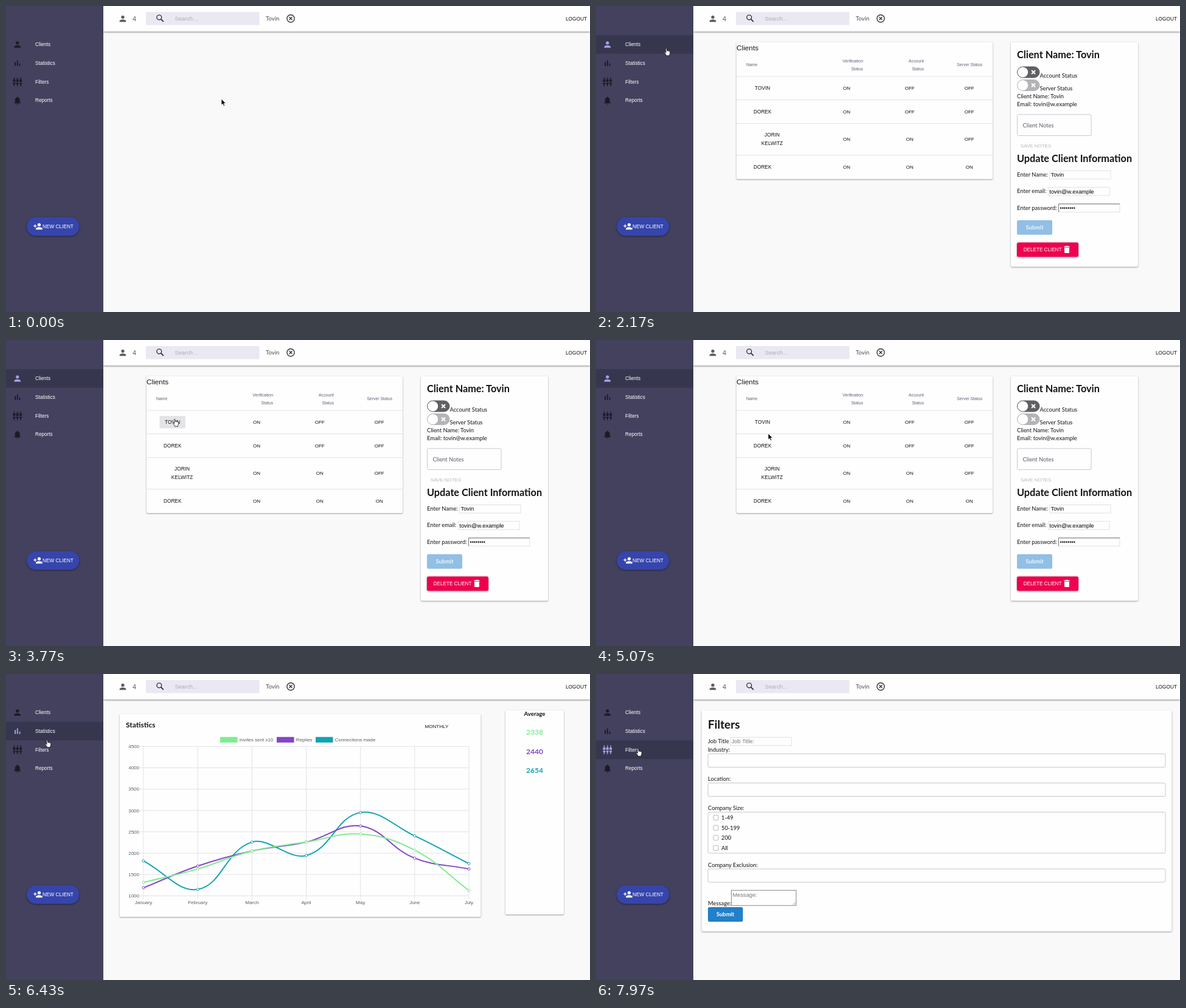
An HTML page that plays this animation: 960x504 px, repeating every 8 s.

```html
<!DOCTYPE html>
<html lang="en">
<head>
<meta charset="utf-8">
<title>Client dashboard</title>
<style>
  html, body { margin: 0; width: 100%; height: 100%; overflow: hidden; background: #f9f9fa; }
  svg { display: block; width: 960px; height: 504px; }
  text { font-family: "Liberation Sans", Arial, sans-serif; fill: #141418; white-space: pre; }
  .lato { font-family: Lato, sans-serif; }
  .bold { font-family: Lato, sans-serif; font-weight: 700; }
  .mid { text-anchor: middle; }
  .end { text-anchor: end; }
  .card { fill: #fefefe; filter: drop-shadow(0 1px 1px #3c3c5080); }
  .raised { filter: drop-shadow(0 1.5px 1.5px #0007); }
  .field { fill: #fefefe; stroke: #c8c8d0; }
  .input { fill: #fefefe; stroke: #e2e2e8; }
  .grid { stroke: #e2e2ea; fill: none; }
</style>
</head>
<body>
<svg id="stage" viewBox="0 0 960 504"></svg>
<script>
const LOOP = 8000;
const CLIENTS_AT = 1900, STATS_AT = 6200, FILTERS_AT = 7600;
const CLIENT = 'Tovin', EMAIL = 'tovin@w.example';

// ---- Markup helpers ----
const text = (x, y, label, size = 8.2, cls = '', fill = '') =>
  `<text x="${x}" y="${y}" font-size="${size}" class="${cls}"${fill && ` style="fill:${fill}"`}>${label}</text>`;
const lato = (x, y, label, fill) => text(x, y, label, 9.33, 'lato', fill);
const rect = (x, y, w, h, attrs = '') => `<rect x="${x}" y="${y}" width="${w}" height="${h}" ${attrs}/>`;
const card = (x, y, w, h) => rect(x, y, w, h, 'rx="2" class="card"');
const field = (x, y, w, h) => rect(x, y, w, h, 'rx="2" class="field"');
const input = (x, y) => rect(x, y, 100.5, 13.5, 'class="input"');
const path = (d, attrs = '') => `<path d="${d}" ${attrs}/>`;
const icon = (x, y, d, size, attrs) =>
  `<g transform="translate(${x} ${y}) scale(${size / 24})">${path(d, attrs)}</g>`;

const slider = x =>
  `M${x + 2} 1h2v5h2v6h-6V6h2zM${x} 14h6v2a3 3 0 0 1-2 2.8V23h-2v-4.2a3 3 0 0 1-2-2.8z`;
const ICONS = {
  person: 'M12 12a4 4 0 1 0 0-8 4 4 0 0 0 0 8zm0 2c-2.7 0-8 1.3-8 4v2h16v-2c0-2.7-5.3-4-8-4z',
  bars: 'M5 9.2h3V19H5zM10.6 5h2.8v14h-2.8zM16.2 13H19v6h-2.8z',
  sliders: [1, 9, 17].map(slider).join(''),
  bell: 'M12 22a2 2 0 0 0 2-2h-4a2 2 0 0 0 2 2zm6-6v-5c0-3-1.6-5.6-4.5-6.3V4a1.5 1.5 0 0 0-3 0v.7C7.6 5.4 6 8 6 11v5l-2 2v1h16v-1z',
  bin: 'M6 19a2 2 0 0 0 2 2h8a2 2 0 0 0 2-2V7H6zM19 4h-3.5l-1-1h-5l-1 1H5v2h14z',
  personAdd: 'M15 12a4 4 0 1 0 0-8 4 4 0 0 0 0 8zM6 10V7H4v3H1v2h3v3h2v-3h3v-2zm9 4c-2.7 0-8 1.3-8 4v2h16v-2c0-2.7-5.3-4-8-4z',
};

// ---- Frame around the pages ----
const MENU = [['Clients', 'person'], ['Statistics', 'bars'], ['Filters', 'sliders'], ['Reports', 'bell']];
const ICON_IDLE = '#1b1b26', ICON_ACTIVE = '#a3a0e6';
const rowY = i => 63.5 + i * 30.7;

const menuItem = ([label, name], i) =>
  `<g id="item${i}">${rect(0, rowY(i) - 15.5, 160, 30.7, 'fill="none"')}` +
  icon(10.8, rowY(i) - 8, ICONS[name], 16, `fill="${ICON_IDLE}"`) +
  text(48, rowY(i) + 2.8, label, 8.2, '', '#fff') + '</g>';

const sidebar = () =>
  rect(0, 0, 160, 504, 'fill="#43415e"') + MENU.map(menuItem).join('') +
  rect(34, 348, 86.5, 30.5, 'rx="15.2" fill="#3645ab" class="raised"') +
  icon(44.5, 355, ICONS.personAdd, 16, 'fill="#fff"') +
  text(60, 366.2, 'NEW CLIENT', 8.25, '', '#fff');

const topBar = () =>
  rect(160, 0, 800, 42, 'fill="#fefefe" style="filter:drop-shadow(0 1px 1.5px #3339)"') +
  icon(184, 13, ICONS.person, 16, 'fill="#5c5c62"') +
  text(208, 24.6, '4', 10.5, 'lato', '#55555c') +
  rect(230, 10, 186.5, 21.5, 'fill="#eae8f3"') +
  '<g fill="none" stroke="#33333a" stroke-width="1.4"><circle cx="251.8" cy="18.8" r="3.9"/>' +
  path('M254.7 21.7l4.2 4.2', 'stroke-width="1.9"') +
  '<circle cx="468" cy="20.6" r="6.1"/>' + path('M465.5 18.1l5 5m0-5l-5 5') + '</g>' +
  text(277.5, 24.2, 'Search…', 9.3, '', '#adacb6') +
  text(427, 23.8, CLIENT, 9.6, 'lato', '#4c4c54') +
  text(920, 23.6, 'LOGOUT', 8.3);

// ---- Clients ----
const TABLE = [
  [137.5, 273.7, [CLIENT.toUpperCase()], 'ON', 'OFF', 'OFF'],
  [176.5, 273.7, ['DOREK'], 'ON', 'OFF', 'OFF'],
  [222, 289.5, ['JORIN', 'KELWITZ'], 'ON', 'ON', 'OFF'],
  [268, 273.7, ['DOREK'], 'ON', 'ON', 'ON'],
];

const tableRow = ([y, nameX, names, ...states]) =>
  names.map((n, i) => text(nameX, y + (i - (names.length - 1) / 2) * 14, n, 8.3, 'mid')).join('') +
  states.map((s, i) => text([412, 515.7, 613.7][i], y, s, 8, 'mid')).join('');

const toggle = (y, track) =>
  rect(692.5, y, 36.5, 18, `rx="9" fill="${track}" stroke="${track}"`) +
  `<circle cx="701.6" cy="${y + 9}" r="8.6" fill="#fefefe"/>` +
  path(`M716 ${y + 6}l6 6m0-6l-6 6`, 'stroke="#fefefe" stroke-width="2"');

const clientsPage = () => {
  const small = (x, y, s, cls) => text(x, y, s, 6.9, cls, '#5f5f7a');
  return card(231, 59.5, 421, 225.5) + text(231, 73, 'Clients', 11.8) +
    small(247, 99, 'Name') + small(439, 93, 'Verification', 'end') + small(439, 105.7, 'Status', 'end') +
    small(539, 93, 'Account', 'end') + small(539, 105.7, 'Status', 'end') +
    small(635, 99, 'Server Status', 'end') +
    path('M231 116h421M231 154.5h421M231 193.5h421M231 245.7h421', 'class="grid"') +
    rect(252.5, 125, 42.5, 20.5, 'id="hover" rx="2" fill="#e4e4e7"') +
    TABLE.map(tableRow).join('') +

    card(682, 59.5, 209, 370) +
    text(692, 86, 'Client Name: ' + CLIENT, 16.25, 'bold') +
    toggle(100, '#606064') + lato(729.5, 118, 'Account Status') +
    toggle(121.5, '#b4b4b8') + lato(729.5, 139.3, 'Server Status') +
    lato(692, 152.3, 'Client Name: ' + CLIENT) + lato(692, 165, 'Email: ' + EMAIL) +
    field(692.5, 178.8, 121.5, 34.7) + lato(701.5, 199.8, 'Client Notes', '#5c5c62') +
    text(697.7, 232.7, 'SAVE NOTES', 8, '', '#b8b8be') +
    text(692, 257, 'Update Client Information', 16.25, 'bold') +
    lato(692, 281, 'Enter Name:') + input(745.5, 271.5) + text(747.5, 281.4, CLIENT, 9.33, '', '#000') +
    lato(692, 308.2, 'Enter email:') + input(743.5, 298.7) + text(745.3, 308.6, EMAIL, 9.33, '', '#000') +
    lato(692, 335.5, 'Enter password:') + input(760.5, 326) +
    path('M760.5 339.5v-13.5h100.5', 'fill="none" stroke="#77777c"') +
    text(762.5, 335.7, '••••••••', 9.1) +
    rect(692, 352.8, 58, 24, 'rx="2.5" fill="#91bfe5"') + text(721, 368, 'Submit', 9.33, 'bold mid', '#eaf4fc') +
    rect(692, 389.5, 101, 23.5, 'rx="2.5" fill="#ee004f" class="raised"') +
    text(702.7, 404.2, 'DELETE CLIENT', 8.15, '', '#fff') + icon(766, 393, ICONS.bin, 16, 'fill="#fff"');
};

// ---- Statistics ----
const MONTHS = ['January', 'February', 'March', 'April', 'May', 'June', 'July'];
const SERIES = [
  { label: 'Invites sent x10', x: 352, mean: 2338, color: '#80ec90', data: [1500, 2000, 2670, 3000, 3300, 2700, 1200] },
  { label: 'Replies', x: 445, mean: 2440, color: '#8445c8', data: [1300, 2110, 2670, 3000, 3600, 2400, 2000] },
  { label: 'Connections made', x: 509, mean: 2654, color: '#12a3b2', data: [2300, 1240, 3000, 2500, 4100, 3230, 2200] },
];
const BASE_Y = 365.4;
const monthX = i => 226 + i * 89.17;
const valueY = v => BASE_Y - (v - 1000) * 0.0703;

const statsPage = () => {
  const levels = Array.from({ length: 8 }, (_, i) => 1000 + i * 500);
  return card(187, 66, 593.5, 334) + text(197, 87.5, 'Statistics', 12, 'bold') +
    text(688.5, 88.8, 'MONTHLY', 8.05) +
    SERIES.map(s => rect(s.x, 103.7, 28.5, 9.2, `fill="${s.color}"`) +
      text(s.x + 31.7, 111, s.label, 8, '', '#5e5e64')).join('') +
    levels.map(v => path(`M220 ${valueY(v)}H761`, 'class="grid"') +
      text(219, valueY(v) + 2.8, v, 8, 'end', '#5e5e64')).join('') +
    MONTHS.map((m, i) => path(`M${monthX(i)} 119V371`, 'class="grid"') +
      text(monthX(i), 379, m, 8, 'mid', '#5e5e64')).join('') +
    '<g id="curves" stroke-width="2"></g>' +
    card(821, 59.5, 96, 336.5) + text(869, 69.3, 'Average', 9.6, 'bold mid') +
    SERIES.map((s, i) => text(869, 100.3 + i * 31.4, s.mean, 12, 'bold mid', s.color)).join('');
};

// Smooth curve through the points; handles follow the neighbours' direction.
function curve({ data, color }, grow) {
  const points = data.map((v, i) => [monthX(i), valueY(v)]);
  const at = ([x, y]) => `${x.toFixed(2)} ${(BASE_Y + (y - BASE_Y) * grow).toFixed(2)}`;
  const handles = points.map((p, i) => {
    const a = points[i - 1] || p, b = points[i + 1] || p;
    const before = Math.hypot(p[0] - a[0], p[1] - a[1]);
    const after = Math.hypot(b[0] - p[0], b[1] - p[1]);
    const offset = k => [p[0] + k * (b[0] - a[0]), p[1] + k * (b[1] - a[1])];
    const tension = 0.4 / (before + after);
    return { into: offset(-tension * before), out: offset(tension * after) };
  });
  const d = points.map((p, i) =>
    i ? `C${at(handles[i - 1].out)} ${at(handles[i].into)} ${at(p)}` : `M${at(p)}`).join('');
  return path(d, `fill="none" stroke="${color}"`) + points.map(p =>
    `<circle r="2" transform="translate(${at(p)})" fill="#fefefe" stroke="${color}" stroke-width="1"/>`).join('');
}

// ---- Filters ----
const filtersPage = () =>
  card(173.5, 60, 773, 364) + text(184, 89.7, 'Filters', 18.9, 'bold') +
  lato(184, 114.2, 'Job Title') + input(221, 104.3) + text(222.7, 114.3, 'Job Title:', 9.33, '', '#77777c') +
  [['Industry:', 128.3, 22], ['Location:', 176.3, 22], ['Company Size:', 224.3, 67.5], ['Company Exclusion:', 317.8, 22]]
    .map(([label, y, h]) => lato(184, y, label) + field(184, y + 3.2, 752, h)).join('') +
  ['1-49', '50-199', '200', 'All'].map((label, i) =>
    rect(193, 232.7 + i * 16.6, 8, 8, 'rx="1.5" fill="#fefefe" stroke="#a6a6ac" stroke-width=".8"') +
    lato(206, 240 + i * 16.6, label)).join('') +
  lato(184, 381, 'Message:') +
  rect(222.5, 356.3, 106.5, 25, 'fill="#fefefe" stroke="#88888e"') +
  path('M323.5 380l4.5-4.5m-2 4.5l2-2', 'stroke="#88888e" stroke-width=".7"') +
  text(224.6, 366.6, 'Message:', 9.25, '', '#77777c') +
  rect(184, 384, 57.5, 24, 'rx="2.5" fill="#2280c8"') + text(212.7, 399.2, 'Submit', 9.33, 'bold mid', '#fff');

// ---- Pointer ----
const ARROW = 'M0 0v10.2l2.3-2.1 1.7 3.7 1.7-.8-1.6-3.5h3.2z';
const HAND = 'M-1 .8c0-1.2 1.8-1.2 1.9 0l.5 3.4.3-.5c.7-.6 1.4-.2 1.6.5.7-.6 1.5-.2 1.6.5.8-.4 1.3.1 1.3.9 0 2.4-.2 3.6-1 4.7v1.5H.3c-.6-1.9-2-3-3-4.7-.5-1 .6-1.5 1.4-.8l.9.8z';
const ROUTE = [ // time, x, y of the tip
  [700, 354, 153], [1600, 115.5, 70], [2300, 115.5, 70], [3100, 277, 130.5], [4300, 277.5, 130.5],
  [4800, 283, 154], [5250, 283, 154], [6000, 66, 95], [6230, 66, 95], [6430, 67.5, 109], [6750, 69, 123.5],
];

function pointerAt(t) {
  const next = ROUTE.findIndex(stop => stop[0] > t);
  if (next < 1) return ROUTE.at(next).slice(1);
  const [t0, x0, y0] = ROUTE[next - 1], [t1, x1, y1] = ROUTE[next];
  const u = (t - t0) / (t1 - t0), k = u * u * (3 - 2 * u);
  return [x0 + (x1 - x0) * k, y0 + (y1 - y0) * k];
}

// ---- Assembly and playback ----
const PAGES = [clientsPage, statsPage, filtersPage];
document.getElementById('stage').innerHTML =
  PAGES.map((page, i) => `<g id="page${i}">${page()}</g>`).join('') +
  topBar() + sidebar() + '<path id="pointer" stroke-width=".8" stroke-linejoin="round"/>';

const get = id => document.getElementById(id);
const pages = PAGES.map((_, i) => get('page' + i));
const items = MENU.map((_, i) => get('item' + i));
const pointer = get('pointer'), hover = get('hover'), curves = get('curves');

function draw(t) {
  const current = [CLIENTS_AT, STATS_AT, FILTERS_AT].filter(start => t >= start).length - 1;
  pages.forEach((page, i) => page.style.display = i === current ? '' : 'none');
  items.forEach((item, i) => {
    item.querySelector('rect').setAttribute('fill', i === current ? '#37364f' : 'none');
    item.querySelector('path').setAttribute('fill', i === current ? ICON_ACTIVE : ICON_IDLE);
  });

  if (current === 1) {
    const u = Math.min(1, Math.max(0, (t - STATS_AT - 11) / 1000));
    const grow = 1 - (1 - u) ** 4;
    curves.innerHTML = [...SERIES].reverse().map(s => curve(s, grow)).join('');
  }

  const [x, y] = pointerAt(t);
  const overName = current === 0 && x > 252 && x < 295 && y > 125 && y < 146;
  const overMenu = x < 160 && y > 48 && y < 171;
  const hand = overName || overMenu;
  hover.style.display = overName ? '' : 'none';
  pointer.setAttribute('d', hand ? HAND : ARROW);
  pointer.setAttribute('fill', hand ? '#fff' : '#000');
  pointer.setAttribute('stroke', hand ? '#111' : '#fff');
  pointer.setAttribute('transform', `translate(${x} ${y})`);
}

function tick() {
  draw(performance.now() % LOOP);
  requestAnimationFrame(tick);
}
tick();
</script>
</body>
</html>
```
